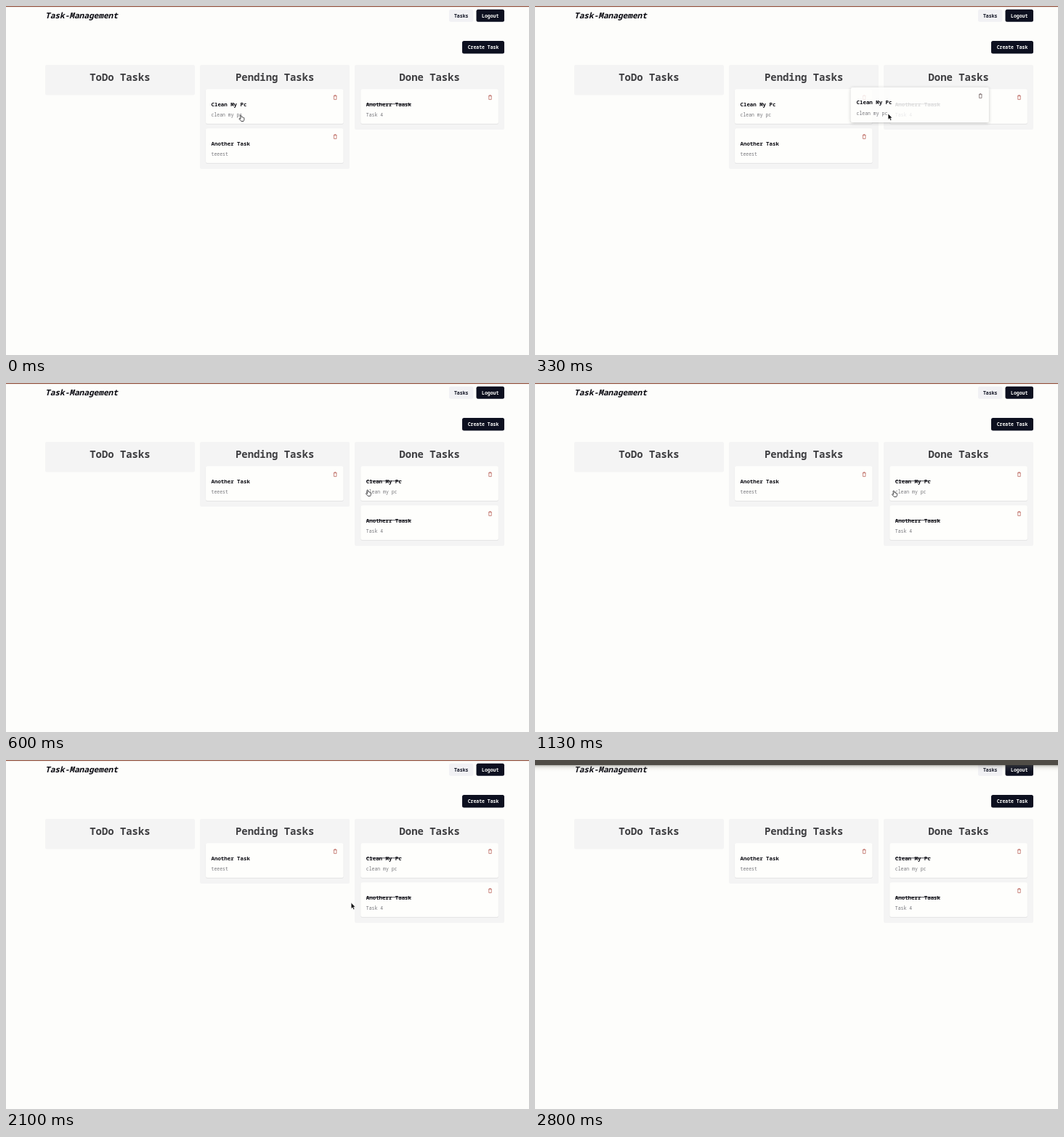
An HTML page for the animation above (3.71 s loop, 720 by 480 pixels).

```html
<!DOCTYPE html>
<html lang="en">
<head>
<meta charset="utf-8">
<title>Task board</title>
<style>
  html, body { margin: 0; width: 100%; height: 100%; overflow: hidden; background: #fdfdfb; }
  svg { display: block; width: 720px; height: 480px; }
  text { font-family: "Noto Sans Mono", "DejaVu Sans Mono", monospace; white-space: pre; }
  .brand { font-size: 11.1px; font-weight: 700; font-style: italic; fill: #08080f; }
  .head { font-size: 13.9px; font-weight: 700; fill: #3d3d40; text-anchor: middle; }
  .name { font-size: 7.41px; font-weight: 700; fill: #08080f; }
  .struck { text-decoration: line-through; }
  .note { font-size: 6.48px; fill: #77777c; }
  .label { font-size: 6.48px; font-weight: 600; text-anchor: middle; }
</style>
</head>
<body>
<svg id="stage" viewBox="0 0 720 480" xmlns="http://www.w3.org/2000/svg">
  <defs>
    <linearGradient id="fade" x1="0" y1="0" x2="0" y2="1">
      <stop offset="0" stop-color="#55554c" stop-opacity=".38"/>
      <stop offset=".4" stop-color="#88887c" stop-opacity=".13"/>
      <stop offset="1" stop-color="#ccccc4" stop-opacity="0"/>
    </linearGradient>
    <filter id="lift" x="-10%" y="-30%" width="120%" height="160%">
      <feDropShadow dx="0" dy="1" stdDeviation="2.2" flood-color="#444448" flood-opacity=".38"/>
    </filter>
  </defs>
  <rect width="720" height="480" fill="#fdfdfb"/>
  <g id="page"></g>
  <g id="before"></g>
  <g id="after"></g>
  <g id="drag"></g>
  <g id="arrow">
    <path d="M0 0V8.2L1.9 6.5L3.2 9.4L4.7 8.7L3.4 5.9H5.8Z" fill="#0a0a0c" stroke="#fdfdfb" stroke-width=".6"/>
  </g>
  <g id="hand">
    <path d="M-1.6 .6Q-.8-.5 0 .6L.5 2.9Q1.3 2.4 1.8 3.1Q2.6 2.7 3 3.6Q3.9 3.4 3.9 4.6V6.2Q3.7 7.6 3 8.5H-.2Q-1.2 7.2-2.8 5.6Q-3.2 4.4-2 4.6L-1 5.2Z"
      fill="#fdfdfb" stroke="#1c1c20" stroke-width=".8" stroke-linejoin="round"/>
  </g>
  <rect id="shade" width="720" fill="url(#fade)"/>
  <rect id="bar" width="720"/>
</svg>
<script>
const LOOP = 3710, DROP = 560;
const PAPER = '#fdfdfb', DARK = '#0d1020';
const $ = id => document.getElementById(id);

const box = (x, y, w, h, fill, r = 2.5, extra = '') =>
  `<rect x="${x}" y="${y}" width="${w}" height="${h}" rx="${r}" fill="${fill}" ${extra}/>`;
const text = (x, y, cls, str, extra = '') =>
  `<text x="${x}" y="${y}" class="${cls}" ${extra}>${str}</text>`;
const button = (x, y, w, h, str, fill, ink) =>
  box(x, y, w, h, fill) + text(x + w / 2, y + h / 2 + 2.3, 'label', str, `fill="${ink}"`);
const column = (x, h) => box(x, 81, 206, h, '#f4f4f4', 2);

function bin(x, y, color) {
  return `<path transform="translate(${x} ${y})" d="M-2.3-2H2.3M-.8-2.1V-3H.8V-2.1M-1.7-2V2.9H1.7V-2"
    fill="none" stroke="${color}" stroke-width=".7" stroke-linejoin="round"/>`;
}

function card(x, y, name, note, { done = false, lifted = false } = {}) {
  const face = lifted
    ? box(x, y, 190, 48, '#fefefd', 2.5, 'opacity=".86" filter="url(#lift)"')
    : box(x, y + .8, 190, 48, '#dedee0') + box(x, y, 190, 48, '#fefefc', 2.5, 'stroke="#ececee" stroke-width=".4"');
  return face + bin(x + 178.4, y + 11.7, lifted ? '#6b5a5a' : '#b5564c') +
    text(x + 7.7, y + 23.5, done ? 'name struck' : 'name', name) +
    text(x + 7.7, y + 38.2, 'note', note);
}

const PEND = 274.8, DONE = 488.1, ROW1 = 114, ROW2 = 168;
$('page').innerHTML =
  text(54, 17, 'brand', 'Task-Management') +
  button(610, 4.8, 33.4, 17, 'Tasks', '#f1f1f4', DARK) +
  button(647.5, 4.8, 38.5, 17, 'Logout', DARK, PAPER) +
  button(628, 48, 58, 17.6, 'Create Task', DARK, PAPER) +
  column(54, 41.5) + text(156.9, 103, 'head', 'ToDo Tasks');

const heads = text(370.2, 103, 'head', 'Pending Tasks') + text(583.2, 103, 'head', 'Done Tasks');
$('before').innerHTML = column(267, 143) + column(480, 89) + heads +
  card(PEND, ROW1, 'Clean My Pc', 'clean my pc') +
  card(PEND, ROW2, 'Another Task', 'teeest') +
  card(DONE, ROW1, 'Anotherr Taask', 'Task 4', { done: true });
$('after').innerHTML = column(267, 89) + column(480, 143) + heads +
  card(PEND, ROW1, 'Another Task', 'teeest') +
  card(DONE, ROW1, 'Clean My Pc', 'clean my pc', { done: true }) +
  card(DONE, ROW2, 'Anotherr Taask', 'Task 4', { done: true });
$('drag').innerHTML = card(PEND, ROW1, 'Clean My Pc', 'clean my pc', { lifted: true });

// time, x, y of the pointer's hot spot
const route = [
  [0, 324, 150], [30, 324, 150], [130, 360, 150], [330, 486, 148], [530, 498.5, 147],
  [1030, 498.5, 147], [1130, 494.5, 148], [1330, 500, 165], [1530, 514, 183],
  [1830, 514, 183], [1970, 494, 194], [2100, 475, 197], [2170, 484, 150], [2290, 540, 12]
];

function pointer(t) {
  let i = 1;
  while (i < route.length - 1 && t > route[i][0]) i++;
  const [a, ax, ay] = route[i - 1], [b, bx, by] = route[i];
  const k = Math.min(1, (t - a) / (b - a));
  return [ax + (bx - ax) * k, ay + (by - ay) * k];
}

const show = (id, on) => $(id).setAttribute('display', on ? 'inline' : 'none');
const move = (id, x, y) => $(id).setAttribute('transform', `translate(${x} ${y})`);

function draw(t) {
  const [x, y] = pointer(t);
  const dragging = t >= 45 && t < DROP;
  const overCard = y >= ROW1 && y < 217 && (x >= DONE || (x >= PEND && x < 465));
  const visible = t < 2285;

  show('before', t < DROP);
  show('after', t >= DROP);
  show('drag', dragging);
  move('drag', x - 326, y - 150);
  show('hand', visible && !dragging && overCard);
  show('arrow', visible && (dragging || !overCard));
  move('hand', x, y);
  move('arrow', x, y);

  // the bar slides in from the top edge
  const k = Math.min(1, Math.max(0, (t - 2400) / 400));
  const h = 1.2 + 5.9 * k * (.7 + .3 * k);
  $('bar').setAttribute('height', h);
  $('bar').setAttribute('fill', k ? '#4f4c46' : '#8f4f3c');
  $('shade').setAttribute('y', h);
  $('shade').setAttribute('height', k ? 2 + 7 * k : 0);
}

const start = performance.now();
function tick() {
  draw((performance.now() - start) % LOOP);
  requestAnimationFrame(tick);
}
tick();
</script>
</body>
</html>
```
